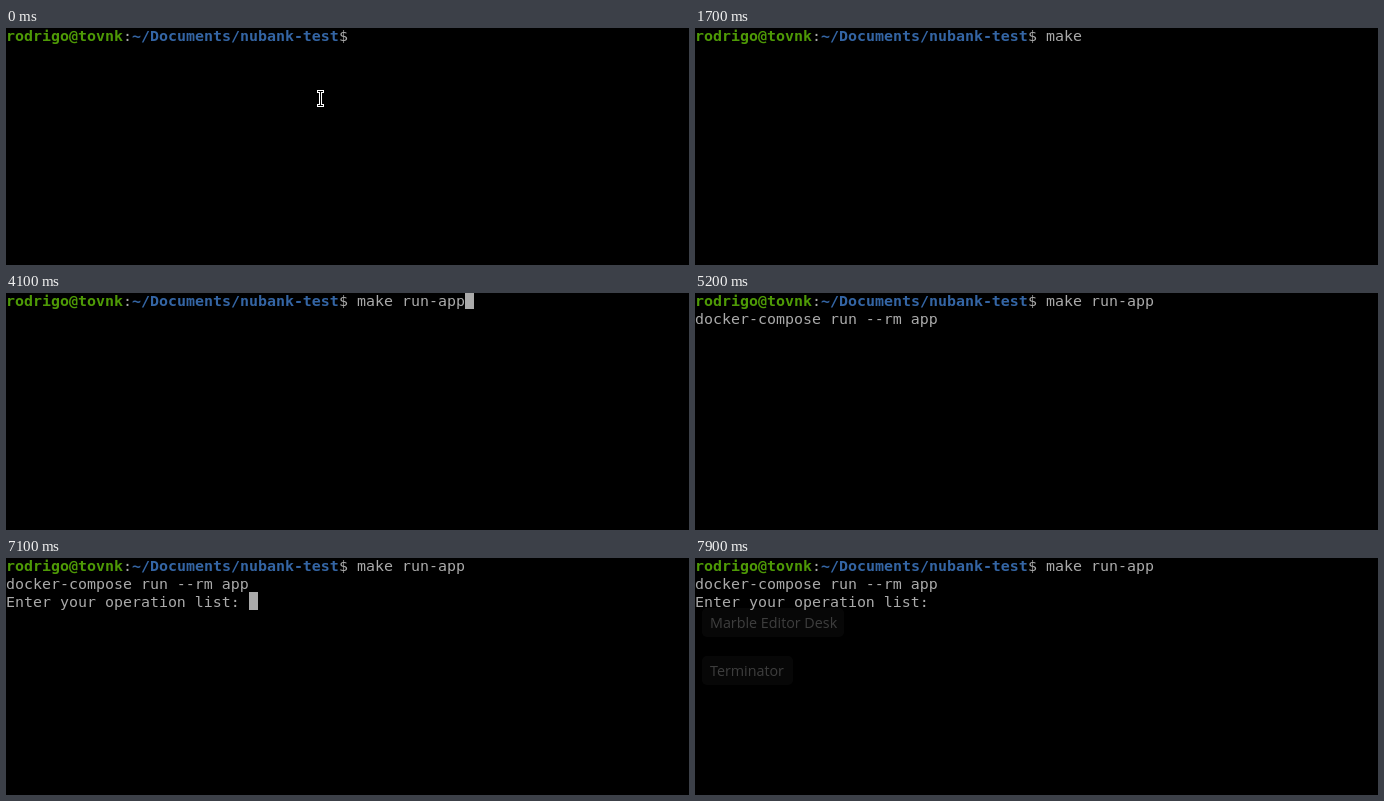
These frames come from a looping animation (683x237 px, 8 s). An HTML page:

```html
<!DOCTYPE html>
<html lang="en">
<head>
<meta charset="utf-8">
<title>Terminal session</title>
<style>
  html, body { margin: 0; width: 100%; height: 100%; overflow: hidden; background: #000; }
  #stage { position: relative; width: 683px; height: 237px; overflow: hidden; background: #000; }
  #stage > * { position: absolute; }
  .text {
    color: #aaa; white-space: pre;
    font: 14.95px/18px "DejaVu Sans Mono", monospace;
  }
  .user, .path { font-weight: bold; }
  .user { color: #4e9a06; }
  .path { color: #3465a4; }
  #cursor { width: 9px; height: 18px; background: #aaa; }
  #pointer { left: 0; top: 0; }
  .tip {
    left: 7px; height: 29px; box-sizing: border-box; padding: 0 8px;
    border-radius: 5px; background: #202020; color: #fff; white-space: pre;
    font: 14.3px/29px "Open Sans", sans-serif;
  }
</style>
</head>
<body>
<div id="stage"></div>
<script>
const LOOP = 8000, CELL = 9, LINE = 18, TOP = -2;
const stage = document.getElementById('stage');

function add(html) {
  stage.insertAdjacentHTML('beforeend', html);
  return stage.lastElementChild;
}

function addText(row, col, text, kind = '') {
  return add(`<span class="text ${kind}" style="left:${col * CELL}px;top:${TOP + 1 + row * LINE}px">${text}</span>`);
}

function addTip(top, width, text) {
  return add(`<div class="tip" style="top:${top}px;width:${width}px">${text}</div>`);
}

const tips = {
  editor: addTip(50, 142, 'Marble Editor Desk'),
  terminal: addTip(98, 91, 'Terminator'),
  settings: addTip(146, 80, 'Settings')
};

const cursor = add('<div id="cursor"></div>');
addText(0, 0, 'rodrigo@tovnk', 'user');
addText(0, 13, ':');
addText(0, 14, '~/Documents/nubank-test', 'path');
addText(0, 37, '$');
const command = addText(0, 39, '');
const output = addText(1, 0, 'docker-compose run --rm app');
const question = addText(2, 0, 'Enter your operation list: ');

const pointer = add(`<svg id="pointer" width="7" height="17">
  <path fill="#fff" d="M0 0H7V3H5V14H7V17H0V14H2V3H0Z"/>
  <path fill="#000" d="M1 1H6V2H4V15H6V16H1V15H3V2H1Z"/>
</svg>`);

// Every track is a list of [start time, value]; each value holds until the next.
const typed = [
  [0, ''], [700, 'm'], [800, 'ma'], [1000, 'mak'], [1100, 'make'], [1200, 'make '],
  [2400, 'make r'], [2500, 'make ru'], [2600, 'make run'], [3500, 'make run-'],
  [3900, 'make run-a'], [4000, 'make run-ap'], [4100, 'make run-app']
];
const blink = [
  [0, 0], [100, 1], [1700, 0], [2300, 1], [3200, 0], [3300, 1],
  [5200, 0], [5900, 1], [6500, 0], [7100, 1], [7700, 0]
];
const pointerAt = [
  [0, [311, 62]], [700, null],
  [5600, [330, 74]], [5700, [385, 90]], [5800, [435, 102]], [5900, [457, 107]],
  [6200, [468, 120]], [6300, [462, 146]], [6400, [430, 178]], [6500, [368, 205]],
  [6600, [270, 221]], [6700, [140, 222]], [6800, [27, 205]], [6900, null]
];
const tipFade = {
  settings: [[0, 0], [7200, .3], [7400, 1], [7700, .4], [7800, 0]],
  terminal: [[0, 0], [7800, .8], [7900, .24]],
  editor: [[0, 0], [7900, .24]]
};
const ENTER = 4600, ASK = 5700;

const valueAt = (track, t) => track.findLast(([start]) => start <= t)[1];
const show = (el, on) => { el.style.visibility = on ? 'visible' : 'hidden'; };

function draw(t) {
  const line = valueAt(typed, t);
  command.textContent = line;
  show(output, t >= ENTER);
  show(question, t >= ASK);

  const row = t < ENTER ? 0 : 2;
  const col = t < ENTER ? 39 + line.length : t < ASK ? 0 : 27;
  cursor.style.left = col * CELL + 'px';
  cursor.style.top = TOP + row * LINE + 'px';
  show(cursor, valueAt(blink, t));

  const spot = valueAt(pointerAt, t);
  show(pointer, spot);
  if (spot) pointer.style.transform = `translate(${spot[0]}px, ${spot[1]}px)`;

  for (const name in tips) tips[name].style.opacity = valueAt(tipFade[name], t);
}

const begin = performance.now();
function tick() {
  draw((performance.now() - begin) % LOOP);
  requestAnimationFrame(tick);
}
tick();
</script>
</body>
</html>
```
